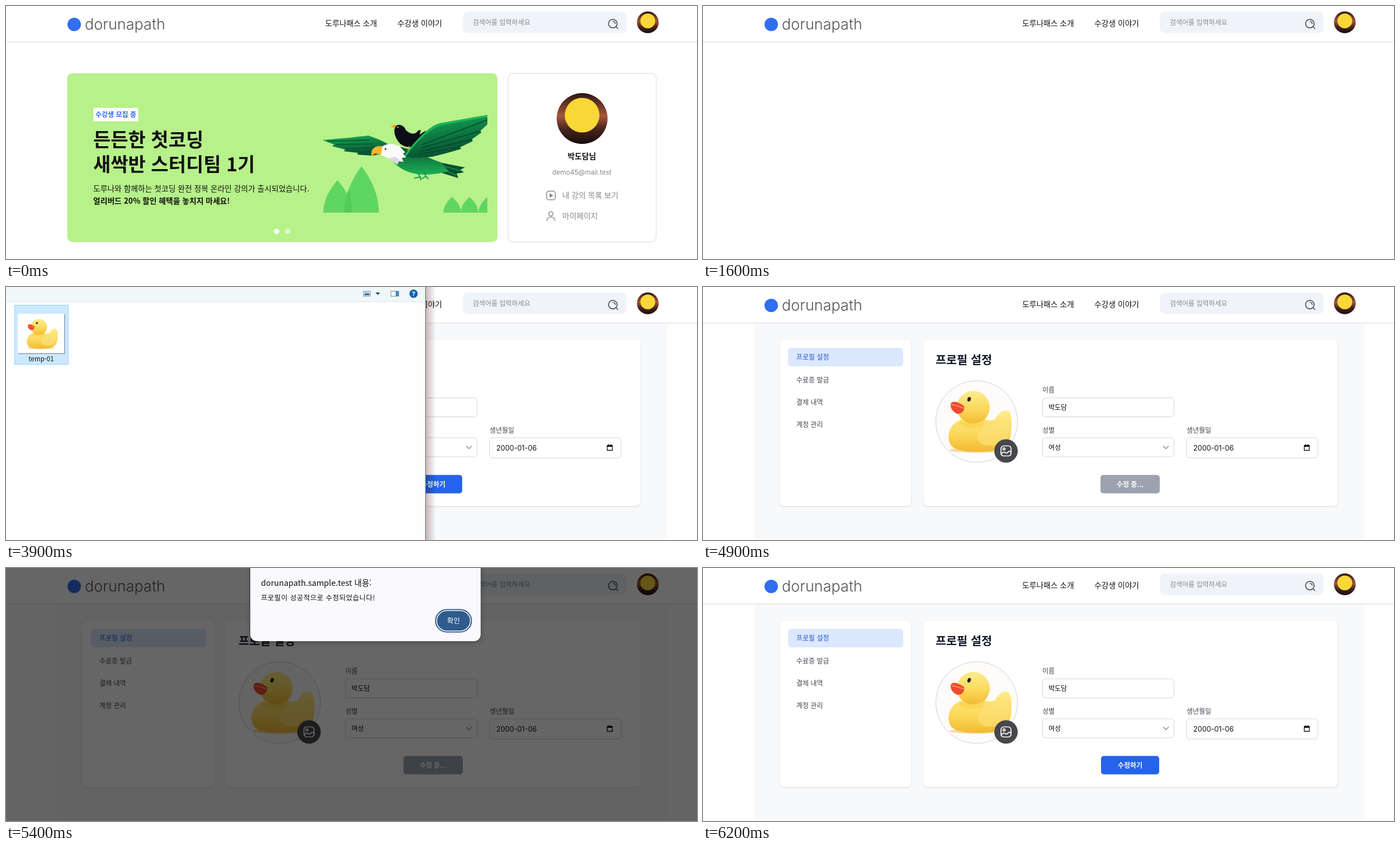
These frames come from a looping animation (1236x453 px, 7.5 s). An HTML page:

```html
<!DOCTYPE html>
<html lang="ko">
<head>
<meta charset="utf-8">
<title>Profile edit demo</title>
<style>
html, body { margin: 0; width: 100%; height: 100%; overflow: hidden; background: #fefefe; }
svg { display: block; }
text { font-family: "Noto Sans CJK KR", "Noto Sans CJK", "Noto Sans", sans-serif; fill: #111; }
.latin { font-family: Inter, Roboto, sans-serif; }
.mid { text-anchor: middle; }
.s12 { font-size: 12px; }
.s14 { font-size: 13.8px; }
.bold { font-weight: 700; }
.medium { font-weight: 500; }
.white { fill: #fff; }
.grey { fill: #86888c; }
.slate { fill: #40444d; }
.line { fill: none; stroke-linecap: round; stroke-linejoin: round; }
.field { fill: #fff; stroke: #d1d5db; }
.card { fill: #fff; filter: drop-shadow(0 1px 1.5px rgba(0,0,0,.13)); }

.home, .menu, .page, .dialog, .picked, .hint, .duck, .save, .wait, .dim, .alert, .cam, .blue {
  animation: 7.5s step-end infinite;
}
.home { animation-name: home; }
.menu { animation-name: menu; }
.page { animation-name: page; }
.cam { animation-name: cam; }
.dialog { animation-name: dialog; }
.hint { animation-name: hint; }
.picked { animation-name: picked; }
.duck { animation-name: duck; }
.blue { animation-name: blue; }
.save { animation-name: save; }
.wait { animation-name: wait; }
.dim { animation-name: dim; }
.alert { animation-name: alert; }

/* 100 ms is 1.333 % of the loop */
@keyframes home { 0% { opacity: 1 } 21.33%, 100% { opacity: 0 } }
@keyframes menu {
  0% { opacity: 0 } 8% { opacity: .3 } 9.33% { opacity: .65 } 10.66% { opacity: .9 }
  12% { opacity: 1 } 21.33%, 100% { opacity: 0 }
}
@keyframes page { 0% { opacity: 0 } 24% { opacity: .6 } 25.33%, 100% { opacity: 1 } }
@keyframes cam { 0% { fill: #55565c } 30.66%, 100% { fill: #47484d } }
@keyframes dialog {
  0% { opacity: 0; transform: scale(.973) }
  41.33% { opacity: .15; transform: scale(.973) }
  42.66% { opacity: .5; transform: scale(.986) }
  44% { opacity: .8; transform: scale(.994) }
  45.33% { opacity: .95; transform: scale(.998) }
  46.66% { opacity: 1; transform: none }
  53.33% { opacity: .75; transform: scale(.992) }
  54.66% { opacity: .4; transform: scale(.982) }
  56% { opacity: .12; transform: scale(.973) }
  57.33%, 100% { opacity: 0; transform: scale(.973) }
}
@keyframes hint { 0% { opacity: 1 } 52%, 100% { opacity: 0 } }
@keyframes picked { 0% { opacity: 0 } 52%, 100% { opacity: 1 } }
@keyframes duck { 0% { opacity: 0 } 57.33%, 100% { opacity: 1 } }
@keyframes blue { 0% { fill: #2563eb } 60% { fill: #1d4ed8 } 65.33%, 100% { fill: #2563eb } }
@keyframes save { 0% { opacity: 1 } 65.33% { opacity: 0 } 81.33%, 100% { opacity: 1 } }
@keyframes wait { 0% { opacity: 0 } 65.33% { opacity: 1 } 81.33%, 100% { opacity: 0 } }
@keyframes dim {
  0% { opacity: 0 } 70.66% { opacity: .32 } 72% { opacity: .6 }
  80% { opacity: .36 } 81.33% { opacity: .1 } 82.66%, 100% { opacity: 0 }
}
@keyframes alert { 0% { opacity: 0 } 70.66% { opacity: .6 } 72% { opacity: 1 } 80%, 100% { opacity: 0 } }
</style>
</head>
<body>
<svg width="1236" height="453" viewBox="0 0 1236 453">
  <defs>
    <linearGradient id="dusk" x2="0" y2="1">
      <stop offset="0" stop-color="#2b1614"/><stop offset=".45" stop-color="#a5573a"/>
      <stop offset=".7" stop-color="#4a251d"/><stop offset="1" stop-color="#150c0d"/>
    </linearGradient>
    <linearGradient id="wing" x2=".35" y2="1">
      <stop offset="0" stop-color="#1bb457"/><stop offset=".5" stop-color="#0d8044"/><stop offset="1" stop-color="#084f31"/>
    </linearGradient>
    <linearGradient id="belly" x2="0" y2="1">
      <stop offset="0" stop-color="#07502f"/><stop offset="1" stop-color="#1cb055"/>
    </linearGradient>
    <linearGradient id="rubber" x2="0" y2="1">
      <stop offset="0" stop-color="#fdec8c"/><stop offset=".55" stop-color="#fbd95b"/><stop offset="1" stop-color="#f3b932"/>
    </linearGradient>
    <linearGradient id="edge">
      <stop offset="0" stop-color="#000" stop-opacity=".25"/><stop offset="1" stop-color="#000" stop-opacity="0"/>
    </linearGradient>
    <clipPath id="art"><rect x="560" y="185" width="301" height="185"/></clipPath>
    <g id="avatar">
      <circle r="45.5" fill="url(#dusk)"/>
      <circle cy="-6" r="31" fill="#f8d836"/>
    </g>
    <path id="leaf" d="M-31 83C-31 48 -14 18 0 0C14 18 31 48 31 83Z" fill="#60d662"/>
    <g id="toy">
      <ellipse cx="491" cy="292" rx="50" ry="4.500" fill="#f6d9a0"/>
      <path d="M460 238C440 246 434 270 444 284C452 294 480 296 500 295C530 294 548 285 551 262C553 245 552 225 546 222C535 219 527 228 522 237C515 240 505 239 500 236Z" fill="url(#rubber)"/>
      <path d="M492 264C506 240 532 246 549 232C553 262 546 282 519 284C500 285 488 278 492 264Z" fill="#fde27a" opacity=".65"/>
      <circle cx="483.500" cy="215.500" r="29.500" fill="url(#rubber)"/>
      <path d="M460 238Q482 252 505 236L500 250Q478 256 458 246Z" fill="#fbd655"/>
      <path d="M443.500 208C450 202 459 208 467 213C469 221 463 228 455 227C447 224 441 216 443.500 208Z" fill="#f04a30"/>
      <path d="M445 211Q455 212 466 217" class="line" stroke="#fb8b62" stroke-width="2"/>
      <ellipse cx="476" cy="201" rx="3" ry="4.300" fill="#25211c" transform="rotate(20 476 201)"/>
    </g>
  </defs>

  <!-- Header -->
  <rect width="1236" height="64" fill="#fff"/>
  <rect y="64" width="1236" height="1" fill="#d9dbe0"/>
  <circle cx="122" cy="33" r="12" fill="#2f6ff0"/>
  <text class="latin" x="141" y="42" font-size="27" font-weight="300" style="fill:#55565a">dorunapath</text>
  <text class="s14" x="571" y="36">도루나패스 소개</text>
  <text class="s14" x="700" y="36">수강생 이야기</text>
  <rect x="817" y="10" width="293" height="38.500" rx="9" fill="#f0f4fa"/>
  <text class="s12 grey" x="835" y="34">검색어를 입력하세요</text>
  <g class="line" stroke="#505257" stroke-width="1.700">
    <circle cx="1085.500" cy="31.500" r="7.700"/>
    <path d="M1091.500 37.500L1094.500 40.500M1086 27.500Q1089.500 28 1089.700 31.500"/>
  </g>
  <use href="#avatar" transform="translate(1148 29.300) scale(.428)"/>

  <!-- Home -->
  <g class="home">
    <rect x="109.500" y="120.500" width="769.500" height="302" rx="9" fill="#b7f18a"/>
    <rect x="156.500" y="182.500" width="80" height="24" fill="#fff"/>
    <text class="s12 bold" x="160" y="199" style="fill:#2f6bea">수강생 모집 중</text>
    <g class="bold" font-size="34">
      <text x="156" y="252">든든한 첫코딩</text>
      <text x="156" y="296">새싹반 스터디팀 1기</text>
    </g>
    <text class="s14" x="156" y="331.500">도루나와 함께하는 첫코딩 완전 정복 온라인 강의가 출시되었습니다.</text>
    <text class="s14 bold" x="156" y="353.500">얼리버드 20% 할인 혜택을 놓치지 마세요!</text>
    <circle cx="484" cy="403.500" r="4.800" fill="#fff"/>
    <circle cx="504" cy="403.500" r="4.800" fill="#fff" opacity=".55"/>

    <g clip-path="url(#art)">
      <use href="#leaf" transform="translate(593 312) scale(.82 .7)"/>
      <use href="#leaf" x="636" y="287"/>
      <path d="M605 370Q606 346 613 328Q619 345 619 370Z" fill="#54ca59"/>
      <use href="#leaf" transform="translate(798 342) scale(.51 .34)"/>
      <use href="#leaf" transform="translate(829 342) scale(.51 .34)"/>
      <use href="#leaf" transform="translate(861 342) scale(.51 .34)"/>

      <path d="M566 240L612 236L648 232Q668 238 688 250L684 262L655 268L628 266L630 263L604 260L607 257L583 251L587 248Z" fill="url(#wing)"/>
      <path d="M575 242L650 240M590 248L655 247M608 256L660 253M632 262L666 258" class="line" stroke="#084f31" stroke-width="1.500"/>
      <path d="M770 279L821 289L813 293L819 298L806 300L809 308L770 296Z" fill="#07502f"/>
      <path d="M775 285L814 295M775 290L805 303" class="line" stroke="#159249" stroke-width="1.500"/>
      <path d="M690 250C722 252 748 270 778 280L792 296Q752 306 726 299Q703 293 686 272Z" fill="url(#belly)"/>
      <path d="M737 300L741 306L731 308M741 306L742 311M748 299L751 305L744 309M751 305L755 309" class="line" stroke="#14944a" stroke-width="2"/>

      <path d="M695 218C699 209 712 212 715 222C722 229 732 232 737 223L742 222L740 230L751 223L738 247C730 256 708 255 700 240C695 232 694 226 695 218Z" fill="#0b0e16"/>
      <path d="M697 212L688 215L696 220Z" fill="#f5a623"/>
      <circle cx="701" cy="217" r="1.200" fill="#f5c64a"/>
      <path d="M721 251L719 258M729 251L728 260" class="line" stroke="#e09a2b" stroke-width="1.500"/>

      <path d="M713 270C729 246 752 217 776 210L861 195V212L848 224L851 226L833 239L835 242L812 253L814 256L786 264L762 270L735 272Z" fill="url(#wing)"/>
      <path d="M745 248L861 204M744 254L848 224M742 260L833 239M738 265L812 253" class="line" stroke="#064a2d" stroke-width="1.800"/>
      <path d="M715 267C733 242 754 219 778 212L861 197" class="line" stroke="#1dba5b" stroke-width="3"/>

      <path d="M668 256Q676 246 691 247L704 251L714 262L710 264L716 271L708 272L711 279L702 278L700 284L684 273L670 266Z" fill="#fafafa"/>
      <path d="M684 273L696 270L704 276L700 284Z" fill="#d5d9df"/>
      <path d="M673 251C660 249 651 257 654 269L660 264L671 266Z" fill="#f8b528"/>
      <circle cx="679" cy="256" r="1.600" fill="#222"/>
    </g>

    <rect x="898" y="120.500" width="265" height="302" rx="10" fill="#fff" stroke="#d8dade"/>
    <use href="#avatar" x="1030.500" y="201.500"/>
    <text class="s14 mid bold" x="1030" y="274">박도담님</text>
    <text class="latin grey mid" x="1030" y="301.500" font-size="12">demo45@mail.test</text>
    <g class="line" stroke="#86888c" stroke-width="1.500">
      <rect x="967" y="331.500" width="15.500" height="15.500" rx="4"/>
      <path d="M973 336.500L977.500 339.300L973 342Z" fill="#86888c"/>
      <circle cx="974.700" cy="372" r="3.700"/>
      <path d="M967.500 384C967.500 375.500 982 375.500 982 384"/>
    </g>
    <text class="s14 grey medium" x="995" y="343.500">내 강의 목록 보기</text>
    <text class="s14 grey medium" x="995" y="380.500">마이페이지</text>
  </g>

  <g class="menu">
    <circle cx="1148" cy="29.300" r="18.500" fill="none" stroke="#2f6ff0" stroke-width="1.500"/>
    <rect class="card" x="951" y="62" width="212" height="178" rx="8"/>
    <g class="s14">
      <text x="975" y="104">내 강의 목록 보기</text>
      <text x="975" y="156">마이페이지</text>
      <text x="975" y="208">로그아웃</text>
    </g>
  </g>

  <!-- Profile page -->
  <g class="page">
    <rect x="92" y="65" width="1090" height="388" fill="#f8f9fb"/>
    <rect class="card" x="137" y="94" width="235" height="298" rx="8"/>
    <rect class="card" x="394" y="94" width="741" height="298" rx="8"/>
    <rect x="152" y="109" width="206" height="33" rx="6" fill="#dbe8fd"/>
    <g class="s12">
      <text x="167" y="130" style="fill:#2455d6">프로필 설정</text>
      <text class="slate" x="167" y="170.500">수료증 발급</text>
      <text class="slate" x="167" y="211">결제 내역</text>
      <text class="slate" x="167" y="251">계정 관리</text>
    </g>
    <text class="bold" x="416" y="138" font-size="20.700" style="fill:#111827">프로필 설정</text>

    <circle cx="489.500" cy="241" r="73" fill="#f4f6f9"/>
    <circle cx="489.500" cy="244" r="27" fill="#dddfe3"/>
    <g class="duck">
      <circle cx="489.500" cy="241" r="73" fill="#fdfcfa"/>
      <use href="#toy"/>
    </g>
    <circle cx="489.500" cy="241" r="73" fill="none" stroke="#cbced5"/>
    <circle class="cam" cx="542" cy="293.500" r="21"/>
    <g class="line" stroke="#fff" stroke-width="1.700">
      <rect x="533" y="284.500" width="18" height="18" rx="5"/>
      <circle cx="538.500" cy="290" r="1.900"/>
      <path d="M533.500 299Q537 294 540.500 296.500Q543.500 299 546 295Q548 293 551 296"/>
    </g>

    <g class="s12">
      <text class="slate" x="607" y="189">이름</text>
      <text class="slate" x="607" y="261">성별</text>
      <text class="slate" x="865" y="261">생년월일</text>
      <rect class="field" x="607.500" y="198.500" width="235" height="34" rx="5"/>
      <rect class="field" x="607.500" y="270" width="235" height="34" rx="5"/>
      <rect class="field" x="865" y="270" width="235" height="36" rx="5"/>
      <text x="618" y="220">박도담</text>
      <text x="618" y="291.500">여성</text>
    </g>
    <path d="M823.500 285L828 289.500L832.500 285" class="line" stroke="#85888f" stroke-width="1.300"/>
    <text class="latin" x="877" y="292.500" font-size="12.700">2000-01-06</text>
    <path d="M1075.500 284H1084.500V292.500H1075.500Z" fill="none" stroke="#111" stroke-width="1.300"/>
    <path d="M1075 283H1085V286H1075ZM1077 281.500H1078.500V284H1077ZM1081.500 281.500H1083V284H1081.500Z"/>

    <g class="save">
      <rect class="blue" x="712" y="336.500" width="104" height="33" rx="5"/>
      <text class="s12 bold mid white" x="764" y="357.500">수정하기</text>
    </g>
    <g class="wait">
      <rect x="711" y="336.500" width="106" height="33" rx="5" fill="#9ca3af"/>
      <text class="s12 bold mid white" x="764" y="357.500">수정 중...</text>
    </g>
  </g>

  <!-- File picker -->
  <g class="dialog">
    <rect x="751" y="-20" width="18" height="520" fill="url(#edge)"/>
    <rect x="-40" y="-20" width="790" height="520" fill="#fefefe"/>
    <rect x="-40" y="-20" width="790" height="46" fill="#eff7f9"/>
    <rect x="-40" y="26" width="790" height="1" fill="#dfe7ea"/>
    <rect x="750" y="-20" width="1" height="520" fill="#d23a3a"/>
    <rect x="639.500" y="7.500" width="12" height="9" fill="#fff" stroke="#7c8894"/>
    <rect x="641" y="9" width="9" height="3" fill="#8fc0ea"/>
    <rect x="641" y="12" width="9" height="3" fill="#3f6fa8"/>
    <path d="M661 10H669L665 14Z" fill="#15305a"/>
    <rect x="688.500" y="7.500" width="14" height="9" fill="#fff" stroke="#7c8894"/>
    <rect x="697" y="8" width="5" height="8" fill="#3b8ed0"/>
    <circle cx="729" cy="12" r="7.500" fill="#0b63b8"/>
    <text class="latin mid bold white" x="729" y="16" font-size="11">?</text>
    <rect class="hint" x="15.500" y="32.500" width="96" height="106" fill="#e8f4ff"/>
    <rect class="picked" x="15.500" y="32.500" width="96" height="106" fill="#cce8ff" stroke="#99d1ff"/>
    <rect x="22" y="49" width="83.500" height="71" fill="#8d99a5"/>
    <rect x="21" y="48" width="83" height="70.500" fill="#fff"/>
    <use href="#toy" transform="translate(-178 -34) scale(.49)"/>
    <text class="mid" x="63" y="133" font-size="11.500">temp-01</text>
  </g>

  <!-- Alert -->
  <rect class="dim" width="1236" height="453"/>
  <g class="alert">
    <rect x="437" y="-20" width="412" height="151" rx="12" fill="#f9f9fe" style="filter:drop-shadow(0 2px 4px rgba(0,0,0,.3))"/>
    <text x="456" y="32" font-size="14.500">dorunapath.sample.test 내용:</text>
    <text x="456" y="57.500" font-size="12.500" letter-spacing=".5">프로필이 성공적으로 수정되었습니다!</text>
    <rect x="768.500" y="74.500" width="64" height="40" rx="20" fill="#fff" stroke="#2d5a8c" stroke-width="2"/>
    <rect x="771" y="77" width="59" height="35" rx="17.500" fill="#2f5b8d"/>
    <text class="mid white" x="800.500" y="99" font-size="12.500">확인</text>
  </g>
</svg>
</body>
</html>
```
